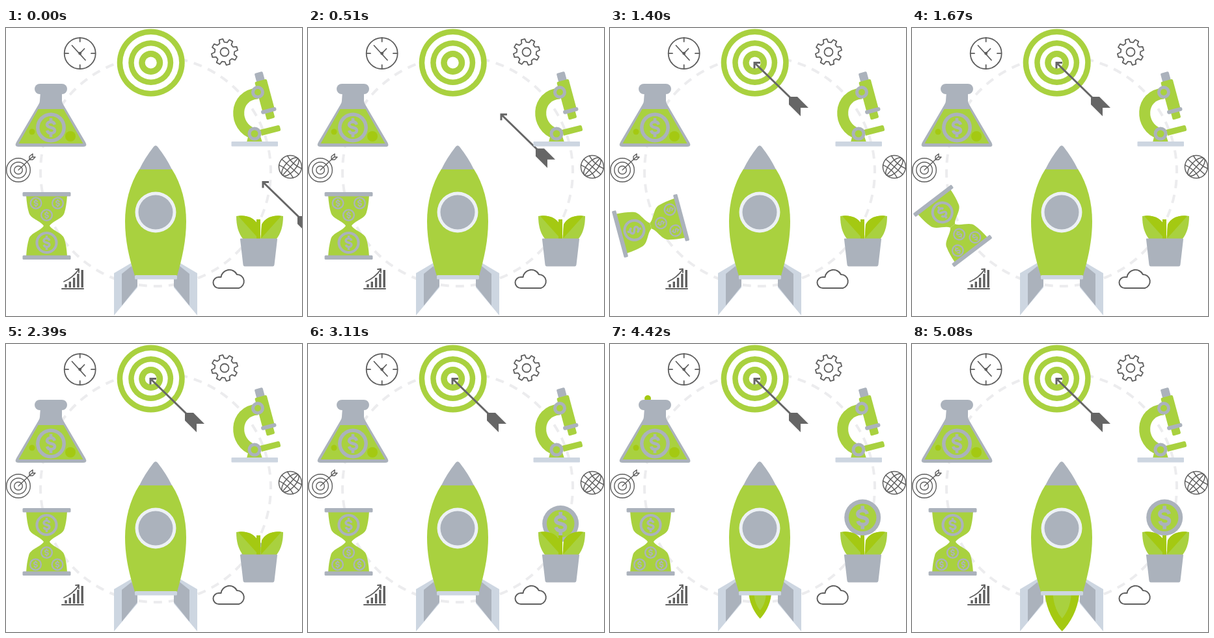
Write an HTML page that moves like this. It is 455 px wide and 444 px high and loops after 5.58 s.

```html
<!DOCTYPE html>
<html lang="en">
<head>
<meta charset="utf-8">
<title>Startup launch</title>
<style>
  html, body { margin: 0; width: 100%; height: 100%; overflow: hidden; background: #fff; }
  svg { display: block; width: 100vw; height: 100vh; }
  .green { fill: #a9d13f; }
  .dark { fill: #a4c912; }
  .grey { fill: #abb2bc; }
  .pale { fill: #cdd6e1; }
  .white { fill: #fff; }
  .ink { fill: #5e5e5e; }
  .line { fill: none; stroke: #5e5e5e; stroke-width: 1.8; stroke-linecap: round; stroke-linejoin: round; }
  .dollar { fill: none; stroke: #abb2bc; stroke-width: 5.6; }
</style>
</head>
<body>
<svg viewBox="0 0 455 444">
  <defs>
    <g id="coin">
      <circle class="grey" r="28"/>
      <circle class="green" r="21.3"/>
      <path class="dollar" d="M7.2-5.5C6-9.5 2.5-10.8 0-10.8C-4.5-10.8-7.3-8.3-7.3-5.4C-7.3-1.6-3.5-.8 0 0C3.5.8 7.3 1.6 7.3 5.4C7.3 8.3 4.5 10.8 0 10.8C-2.5 10.8-6 9.5-7.2 5.5M0-18V-10M0 10V18"/>
    </g>
    <g id="fin">
      <path class="pale" d="M193 362L166 378V443L202 400V386Z"/>
      <path class="grey" d="M193 367L178 379V428L202 398V386Z"/>
    </g>
    <g id="leaf">
      <path class="green" d="M354 290C368 287 382 293 387 303L388.500 326H365C357 317 354 304 354 290Z"/>
      <path class="dark" d="M357 290C371 288 382 293 387 303L388.500 325Z"/>
    </g>
    <g id="bulb">
      <path class="green" d="M31 258H94Q93 274 90 284C88 294 72 297 67 305H58C53 297 37 294 35 284Q32 274 31 258Z"/>
      <rect class="grey" x="25.5" y="253" width="74" height="6.5" rx="1.5"/>
    </g>
    <clipPath id="abovePot"><path d="M350 230H426V325H350Z"/></clipPath>
  </defs>

  <circle cx="230" cy="221" r="177" fill="none" stroke="#ececee" stroke-width="4" stroke-dasharray="13 10.17" stroke-dashoffset="10"/>

  <!-- outline icons -->
  <g class="line">
    <circle cx="113.700" cy="39.200" r="24"/>
    <path d="M113.700 15V21M113.700 57V63M90 39.200H96M131 39.200H137M101.500 27L122 49.500M113.700 39.200L120.500 32"/>
    <circle class="ink" cx="113.700" cy="39.200" r="1.5"/>

    <path id="gear"/>
    <circle cx="336" cy="37" r="6.5"/>

    <g transform="translate(437 214) rotate(42)" stroke-width="1.5">
      <circle r="17.5"/>
      <ellipse rx="8" ry="17.5"/>
      <path d="M0-17.5V17.5M-17.5 0H17.5M-14.5-9.5Q0-4.5 14.5-9.5M-14.5 9.5Q0 4.5 14.5 9.5"/>
    </g>

    <g stroke-width="1.4">
      <circle cx="19" cy="219" r="18.3"/>
      <circle cx="19" cy="219" r="12.3"/>
      <circle cx="19" cy="219" r="6.3"/>
      <path d="M19 219L40 199M36 202V198L41 194V199H45L41 203H36"/>
    </g>

    <path d="M89 391Q103 385 112 372M107 372L112 371.5L112 377"/>
    <path d="M86 402H119" stroke-width="2"/>
    <path d="M327 401A8.500 8.500 0 0 1 327 384H330.500A13 13 0 0 1 355 380A10.700 10.700 0 0 1 358 401Z" stroke-width="2"/>
  </g>
  <path class="ink" d="M90.300 395h3.400v5h-3.400zM96.600 391h3.400v9h-3.400zM102.900 385h3.400v15h-3.400zM109.200 379h3.400v21h-3.400zM115.500 373h3.400v27h-3.400z"/>

  <!-- target and arrow -->
  <g id="target"></g>
  <g id="arrow">
    <path d="M222 53.5L283 113M231 53.5H222V62.5" fill="none" stroke="#666" stroke-width="3"/>
    <path fill="#666" d="M275 106H288L305 123H293V136L275 118Z"/>
  </g>

  <!-- microscope -->
  <path class="green" d="M373 164H390L394 176H370Z"/>
  <path d="M387 101C349.500 103 348.500 153 381 163" fill="none" stroke="#a9d13f" stroke-width="17"/>
  <path class="green" d="M390 157L418 150Q420.500 149.500 421 152L422 156Q422.500 158.500 420 159L393 166Z"/>
  <g transform="translate(388 68.500) rotate(-15)">
    <rect class="grey" x="-6.500" width="13" height="16" rx="2"/>
    <rect class="green" x="-9.500" y="13" width="19" height="47" rx="2"/>
    <rect class="green" x="-6.500" y="62" width="13" height="12" rx="2"/>
    <rect class="grey" x="-12" y="58" width="24" height="6" rx="3"/>
  </g>
  <circle class="grey" cx="387" cy="99" r="10"/>
  <circle class="green" cx="387" cy="99" r="5"/>
  <circle class="grey" cx="382" cy="163" r="10.500"/>
  <circle class="green" cx="382" cy="163" r="5.500"/>
  <rect class="pale" x="346.500" y="175" width="71.500" height="7.500" rx="1"/>

  <!-- flask -->
  <circle id="bubbleA" class="dark" cx="58" r="5"/>
  <circle id="bubbleB" class="dark" cx="78.500" r="4.500"/>
  <path class="grey" d="M53 98H86V112Q86 115 88 118L122 176Q126 183 119 183H19Q12 183 16 176L50 118Q52 115 52 112Z"/>
  <rect class="grey" x="44" y="86" width="50" height="16" rx="8"/>
  <path class="green" d="M49.500 125H88.500L118.500 178H19.500Z"/>
  <circle class="dark" cx="99" cy="167" r="8"/>
  <circle class="dark" cx="40" cy="160" r="4.500"/>
  <use href="#coin" transform="translate(69 153.500) scale(.82)"/>

  <!-- hourglass -->
  <g id="hourglass">
    <use href="#bulb"/>
    <use href="#bulb" transform="rotate(180 62.5 305)"/>
    <use href="#coin" transform="translate(46 270) scale(.34)"/>
    <use href="#coin" transform="translate(79.5 270) scale(.34)"/>
    <use href="#coin" transform="translate(62.5 288.500) scale(.34)"/>
    <use href="#coin" transform="translate(62.5 331) scale(.61)"/>
  </g>

  <!-- plant -->
  <g clip-path="url(#abovePot)"><use id="plantCoin" href="#coin"/></g>
  <use href="#leaf"/>
  <use href="#leaf" transform="translate(780) scale(-1 1)"/>
  <path class="dark" d="M385 295H391V326H385Z"/>
  <path class="grey" d="M361 324.500H416Q417.500 324.500 417 326L412.500 365Q412 367.500 410 367.500H367Q365 367.500 364.500 365L360 326Q359.500 324.500 361 324.500Z"/>

  <!-- rocket -->
  <use href="#fin"/>
  <use href="#fin" transform="translate(460) scale(-1 1)"/>
  <g id="flame">
    <path class="dark" d="M-26.500-1C-24 22-13 43 0 56C13 43 24 22 26.500-1Z"/>
    <path class="green" d="M-14-1C-13 16-7 28 0 36C7 28 13 16 14-1Z"/>
  </g>
  <path class="green" d="M205 217.500H255C270 241 277 270 277 298C277 327 271 354 263 382H198C189 354 183 327 183 298C183 270 190 241 205 217.500Z"/>
  <path class="grey" d="M205 218Q213 201 227 183Q230 179.500 233 183Q247 201 255 218Z"/>
  <rect class="pale" x="198" y="381" width="65" height="6.500" rx="1.500"/>
  <circle cx="230" cy="284" r="31.500" fill="#edf1f5"/>
  <circle class="grey" cx="230" cy="284" r="26.500"/>
</svg>
<script>
const LOOP = 5580, STEP = 30;
const $ = id => document.getElementById(id);

$('target').innerHTML = [52, 43.5, 34.5, 26, 18.5, 9].map((r, i) =>
  `<circle class="${i % 2 ? 'white' : 'green'}" cx="222.7" cy="53.5" r="${r}"/>`).join('');

function gearPath(cx, cy, teeth) {
  const points = [];
  for (let i = 0; i < teeth; i++) {
    for (const [offset, r] of [[-.31, 15.2], [-.18, 20.3], [.18, 20.3], [.31, 15.2]]) {
      const a = (i + offset) * 2 * Math.PI / teeth - 1.06;
      points.push(`${cx + r * Math.cos(a)} ${cy + r * Math.sin(a)}`);
    }
  }
  return `M${points.join('L')}Z`;
}
$('gear').setAttribute('d', gearPath(336, 37, 8));

// Whole steps since start, limited to 0..count.
const steps = (t, start, count) =>
  Math.min(count, Math.max(0, Math.floor((t - start) / STEP + 1e-6)));

// Linear interpolation through [step, value] keys.
function track(n, keys) {
  for (let i = 1; i < keys.length; i++) {
    const [n0, v0] = keys[i - 1], [n1, v1] = keys[i];
    if (n <= n1) return v0 + (v1 - v0) * (n - n0) / (n1 - n0);
  }
  return keys[keys.length - 1][1];
}

const place = (id, transform) => $(id).setAttribute('transform', transform);

function draw(t) {
  const away = 1 - steps(t, 0, 30) / 30;
  place('arrow', `translate(${173 * away} ${184 * away})`);

  place('hourglass', `rotate(${7.5 * steps(t, 1100, 24)} 62.5 305)`);

  const rise = steps(t, 2360, 29);
  $('plantCoin').style.display = rise ? '' : 'none';
  place('plantCoin', `translate(388.2 ${267.5 + 2.38 * (29 - rise)})`);

  const n = steps(t, 3730, 45);
  place('flame', `translate(230.7 387) scale(${track(n, [[0, 0], [10, .8], [20, .5], [30, 1]])})`);
  $('bubbleA').setAttribute('cy', track(n, [[0, 92], [10, 61], [28, 93]]));
  $('bubbleB').setAttribute('cy', track(n, [[0, 94], [30, 94], [36, 75.5], [45, 91]]));
}

function frame(now) {
  draw(now % LOOP);
  requestAnimationFrame(frame);
}
draw(0);
requestAnimationFrame(frame);
</script>
</body>
</html>
```
